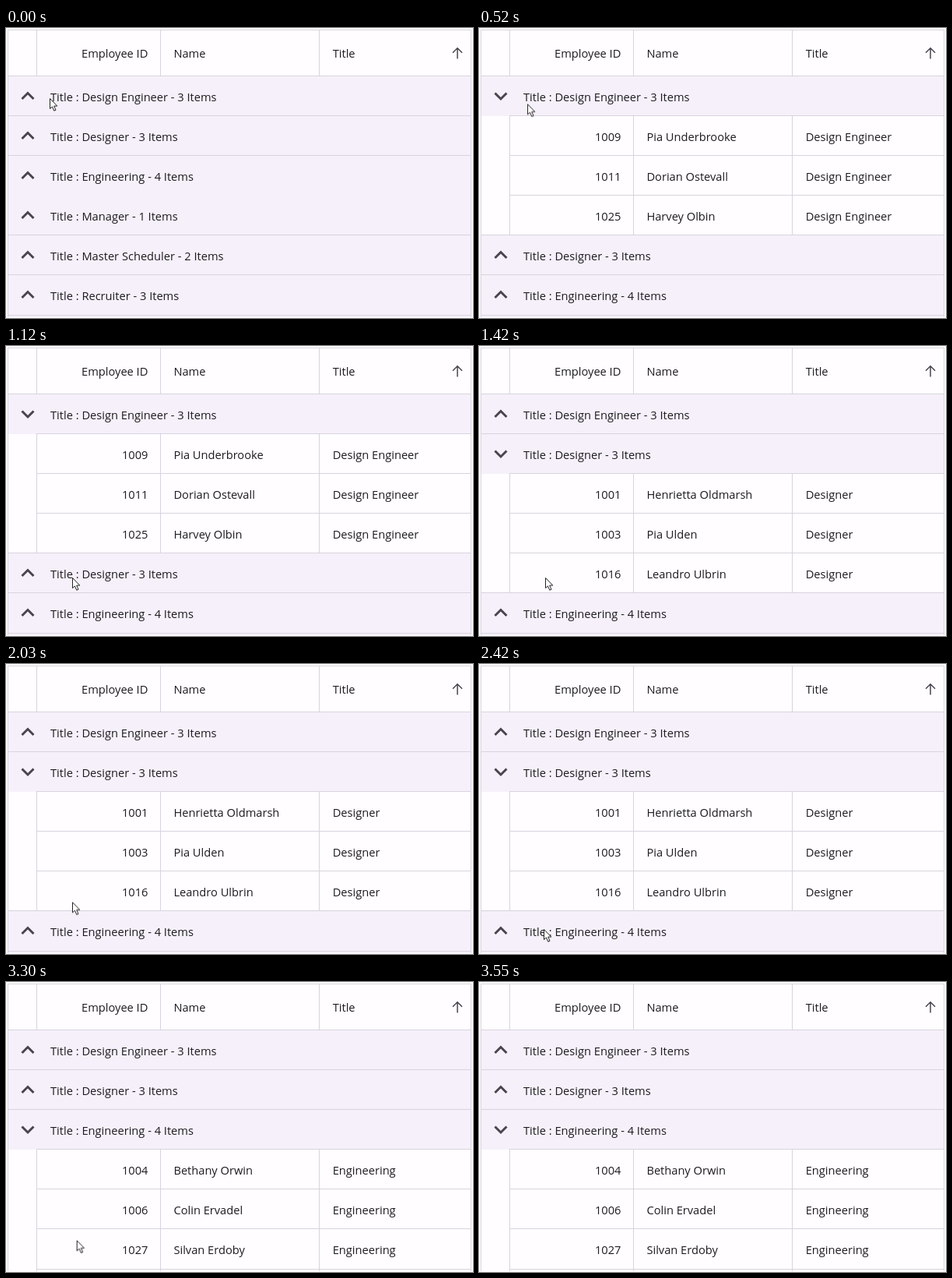
Write an HTML page that moves like this. It is 600 px wide and 372 px high and loops after 4300 ms.

```html
<!DOCTYPE html>
<html lang="en">
<head>
<meta charset="utf-8">
<title>Grouped data grid</title>
<style>
  html, body { margin: 0; width: 100%; height: 100%; overflow: hidden; background: #fff; }
  svg { display: block; width: 600px; height: 372px; }
  text { font: 14.65px "Open Sans", "Noto Sans", sans-serif; fill: #1c1b1f; }
  rect { shape-rendering: crispEdges; }
  .end { text-anchor: end; }
  .chevron { fill: none; stroke: #49454f; stroke-width: 3; }
  .sort { fill: none; stroke: #49454f; stroke-width: 1.5; }
  #pages { animation: page 4300ms step-end infinite; }
  #cursor { animation: move 4300ms linear infinite; }

  @keyframes page {
    0% { transform: translateY(0); }
    2.7907% { transform: translateY(-500px); }
    33.0233% { transform: translateY(-1000px); }
    64.186%, 100% { transform: translateY(-1500px); }
  }
  @keyframes move {
    0% { transform: translate(56px, 90px); animation-timing-function: step-end; }
    12.093% { transform: translate(62px, 97px); animation-timing-function: cubic-bezier(.35, .2, .5, 1); }
    20.465% { transform: translate(94px, 314px); animation-timing-function: ease-in-out; }
    23.953% { transform: translate(86px, 301px); }
    26.0465% { transform: translate(85px, 297px); animation-timing-function: step-end; }
    47.209% { transform: translate(85px, 305px); animation-timing-function: ease-out; }
    52.326% { transform: translate(82px, 338px); }
    56.279% { transform: translate(83px, 340px); animation-timing-function: step-end; }
    76.744% { transform: translate(90px, 332px); animation-timing-function: cubic-bezier(.4, .2, .8, .8); }
    81.86% { transform: translate(366px, 22px); animation-timing-function: step-end; }
    82.558%, 100% { transform: translate(700px, -60px); }
  }
</style>
</head>
<body>
<svg viewBox="0 0 600 372">
  <g id="pages"></g>
  <path id="cursor" d="M.5.5V13.6L3.4 10.9 5.8 16.2 8 15.2 5.7 10.1H9.8Z"
        fill="#fff" stroke="#222" stroke-width="1"/>
</svg>
<script>
  const LINE = '#d8d3de', WHITE = '#fffdff', TINT = '#f6f0fa';
  const LEFT = 2, RIGHT = 597, INDENT = 39, BOTTOM = 371, PAGE = 500, LAST = 6;
  const COLUMNS = [INDENT, 198, 402];

  const groups = [
    ['Design Engineer', 3, [[1009, 'Pia Underbrooke'], [1011, 'Dorian Ostevall'], [1025, 'Harvey Olbin']]],
    ['Designer', 3, [[1001, 'Henrietta Oldmarsh'], [1003, 'Pia Ulden'], [1016, 'Leandro Ulbrin']]],
    ['Engineering', 4, [[1004, 'Bethany Orwin'], [1006, 'Colin Ervadel'], [1027, 'Silvan Erdoby'], ['', '']]],
    ['Manager', 1], ['Master Scheduler', 2], ['Recruiter', 3], ['', 0]
  ];

  const rect = (x, y, w, h, fill) => `<rect x="${x}" y="${y}" width="${w}" height="${h}" fill="${fill}"/>`;
  const text = (x, y, s, cls = '') => `<text x="${x}" y="${y}" class="${cls}">${s}</text>`;
  const hline = (x, y) => rect(x, y, RIGHT + 1 - x, 1, LINE);
  const vlines = (y, h) => COLUMNS.map(x => rect(x, y, 1, h, LINE)).join('');
  const rowTop = i => Math.floor(61 + 51.17 * i);
  const rowHeight = i => Math.min(rowTop(i + 1), BOTTOM - 1) - rowTop(i);

  function cells(y, id, name, title) {
    return text(182.4, y, id, 'end') + text(215.4, y, name) + text(419.7, y, title);
  }

  function header() {
    return rect(LEFT, 2, RIGHT - LEFT, 60, WHITE) + hline(LEFT, 2) + hline(LEFT, 61) + vlines(2, 60) +
      cells(38, 'Employee ID', 'Name', 'Title') +
      '<path class="sort" d="M580 39.5V26M574 31.8 580 25.8 586 31.8"/>';
  }

  function groupRow(i, [title, count], open) {
    const y = rowTop(i);
    const fill = rect(LEFT, y + 1, RIGHT - LEFT, rowHeight(i), TINT);
    if (!title || i === LAST) return fill;
    const arrow = open ? 'M20.5 22.5 28 30 35.5 22.5' : 'M20.5 30 28 22.5 35.5 30';
    return fill + `<path class="chevron" transform="translate(0 ${y})" d="${arrow}"/>` +
      text(57, y + 33, `Title : ${title} - ${count} Items`);
  }

  function dataRow(i, [id, name], title) {
    const y = rowTop(i), h = rowHeight(i);
    return rect(LEFT, y + 1, RIGHT - LEFT, h, WHITE) + vlines(y, h + 1) +
      (id ? cells(y + 33, id, name, title) : '');
  }

  function page(open) {
    const rows = [], lines = [];
    const add = (draw, inner) => {
      const i = rows.length;
      if (i > LAST) return;
      rows.push(draw(i));
      // The collapsed page has no rule under its third group.
      if (i < LAST && !(open < 0 && i === 2)) lines.push(hline(inner ? INDENT : LEFT, rowTop(i + 1)));
    };
    groups.forEach((g, k) => {
      const isOpen = k === open;
      add(i => groupRow(i, g, isOpen), isOpen);
      if (isOpen) g[2].forEach((d, n) => add(i => dataRow(i, d, g[0]), n < g[2].length - 1));
    });
    return `<g transform="translate(0 ${PAGE * (open + 1)})">` + rows.join('') + header() + lines.join('') +
      rect(LEFT, 2, 1, BOTTOM - 2, LINE) + rect(RIGHT, 2, 1, BOTTOM - 2, LINE) + '</g>';
  }

  document.getElementById('pages').innerHTML = [-1, 0, 1, 2].map(page).join('');
</script>
</body>
</html>
```
